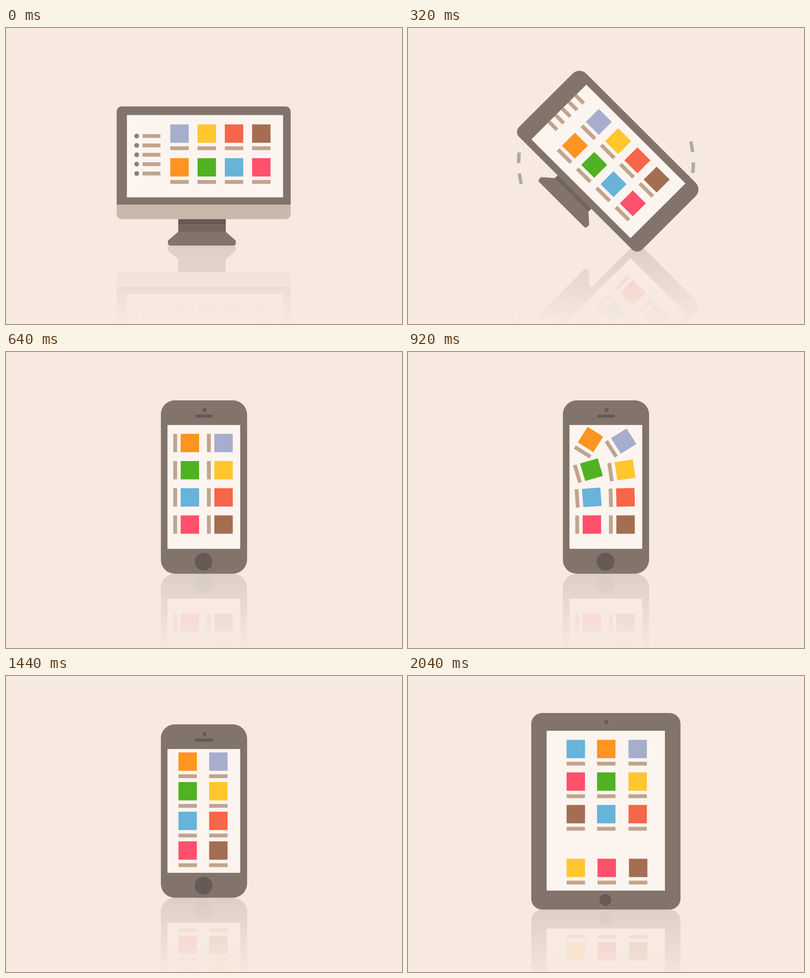
Write an HTML page that moves like this. It is 800 px wide and 600 px high and loops after 3.36 s.

```html
<!DOCTYPE html>
<html lang="en">
<head>
<meta charset="utf-8">
<title>Responsive devices</title>
<style>
  html, body { margin: 0; width: 100%; height: 100%; overflow: hidden; background: #f7e9e0; }
  svg { display: block; width: 100%; height: 100%; }
</style>
</head>
<body>
<svg id="stage" viewBox="0 0 800 600"></svg>
<script>
const LOOP = 3360, STEP = 40;
const BODY = '#82746b', DARK = '#655a55', BAR = '#c0a48e', SCREEN = '#fcf4ef';
const PURPLE = '#a7aecd', YELLOW = '#ffc62e', RED = '#f66648', BROWN = '#a36e52';
const ORANGE = '#ff9421', GREEN = '#50b222', BLUE = '#67b3d9', PINK = '#ff506c';
const GRID = [[PURPLE, YELLOW, RED, BROWN], [ORANGE, GREEN, BLUE, PINK]];
const EXTRA = [BLUE, PINK, BROWN, YELLOW];
const TABLET_ROWS = [148, 214, 280, 389];
const stage = document.getElementById('stage');

const lerp = (a, b, k) => a + (b - a) * k;
const rad = deg => deg * Math.PI / 180;

// cubic-bezier(.75, 0, .25, 1) over a time window
function ease(t, from, to) {
  const x = (t - from) / (to - from);
  if (x <= 0) return 0;
  if (x >= 1) return 1;
  let lo = 0, hi = 1, s = 0.5;
  for (let i = 0; i < 24; i++) {
    s = (lo + hi) / 2;
    const bx = 2.25 * s * (1 - s) ** 2 + 0.75 * s * s * (1 - s) + s ** 3;
    if (bx < x) lo = s; else hi = s;
  }
  return s * s * (3 - 2 * s);
}

const rect = (x, y, w, h, fill, r = 0) =>
  `<rect x="${x}" y="${y}" width="${w}" height="${h}" rx="${r}" fill="${fill}"/>`;
const disc = (x, y, r, fill) => `<circle cx="${x}" cy="${y}" r="${r}" fill="${fill}"/>`;

// Box centred on the origin with separate top and bottom radii
function box(w, h, top, bottom, fill) {
  const x = w / 2, y = h / 2;
  return `<path fill="${fill}" d="M${-x} ${top - y}a${top} ${top} 0 0 1 ${top} ${-top}H${x - top}` +
    `a${top} ${top} 0 0 1 ${top} ${top}V${y - bottom}a${bottom} ${bottom} 0 0 1 ${-bottom} ${bottom}` +
    `H${bottom - x}a${bottom} ${bottom} 0 0 1 ${-bottom} ${-bottom}Z"/>`;
}

function icon(x, y, angle, fill) {
  return `<g transform="translate(${x} ${y}) rotate(${angle})">` +
    rect(-18.6, -18.6, 37.2, 37.2, fill) + rect(-18.6, 25.8, 37.2, 7.7, BAR) + '</g>';
}

function stand(lift) {
  return `<g transform="translate(0 ${-lift})">` +
    rect(-51.3, 120, 96, 20, DARK) + rect(-51.3, 139.8, 96, 15.5, '#72655d') +
    `<path fill="${BODY}" d="M-51.3 154.5H44.7L65 172.5V177.5Q65 182.5 60 182.5H-67.3Q-72.3 182.5 -72.3 177.5V172.5Z"/>` +
    '<path fill="#c8b9ad" d="M-175.75 99.5H175.75V119a10 10 0 0 1 -10 10H-165.75a10 10 0 0 1 -10 -10Z"/></g>';
}

function trails(t, turn) {
  const r = 176.5;
  const tail = Math.max(-38, -14.1 + 0.2625 * (t - 320));
  const head = lerp(-40, 65, turn);
  if (head <= tail) return '';
  const at = a => `${400 - r * Math.cos(rad(a))} ${273 - r * Math.sin(rad(a))}`;
  const arc = spin => `<path d="M${at(tail)}A${r} ${r} 0 0 1 ${at(head)}" fill="none" stroke="#ababab"` +
    ` stroke-width="7" stroke-dasharray="21.5 21.2" transform="rotate(${spin} 400 273)"/>`;
  return arc(0) + arc(180);
}

function icons(t, turn, grow, cx, cy) {
  const cos = Math.cos(rad(90 * turn)), sin = Math.sin(rad(90 * turn));
  let out = '';
  GRID.forEach((row, i) => row.forEach((fill, j) => {
    const start = 640 + 40 * (2 * j + 1 - i);
    const flip = ease(t, start, start + 520);
    const lx = lerp(-48.8, -89.25, turn) + 55.1 * j;
    const ly = lerp(-44.5, -39.5, turn) + lerp(68.4, 68, turn) * i;
    let x = lerp(cx + lx * cos - ly * sin, i ? 367 : 429, flip);
    let y = lerp(cy + lx * sin + ly * cos, 173.5 + 60.1 * j, flip);
    x = lerp(x, (i ? 400.5 : 464) + (j === 3 ? 1 : 0), grow);
    y = lerp(y, TABLET_ROWS[j], grow);
    out += icon(x, y, 90 * (turn - flip), fill);
  }));
  if (grow > 0) EXTRA.forEach((fill, j) => {
    out += icon(lerp(302, 339, grow), lerp(173.5 + 60.1 * j, TABLET_ROWS[j], grow), 0, fill);
  });
  return out;
}

function sidebar(turn) {
  let out = '';
  for (let j = 0; j < 5; j++) {
    const y = -39.5 + 19 * j;
    out += disc(-135.3, y, 4.8, '#8d7f79') + rect(-123.5, y - 3.8, 36.2, 7.6, BAR);
  }
  return `<g transform="translate(${-60 * turn} ${-15 * turn})">${out}</g>`;
}

function draw(t) {
  const turn = ease(t, 0, 640), grow = ease(t, 1560, 2040), pop = ease(t, 240, 560);
  // monitor, phone, tablet
  const mix = (a, b, c) => a + (b - a) * turn + (c - b) * grow;
  const bulge = 4 * turn * (1 - turn);
  const cx = mix(399.3, 400, 399.75) + 4.95 * bulge;
  const cy = mix(258.5, 273.75, 274.25) + 2.75 * bulge;
  const floor = mix(441, 449.5, 473.5) + bulge;
  const pose = `transform="translate(${cx} ${cy}) rotate(${90 * turn})"`;

  const sw = mix(315.5, 251, 324), sh = mix(166.8, 147, 239);
  const sx = mix(2.7, -0.3, -1.25) - sw / 2, sy = mix(1.4, 0.3, 0.25) - sh / 2;

  const hardware =
    disc(mix(151.25, 151.25, 179.75), 1, mix(18, 18, 12) * pop, DARK) +
    disc(mix(-156.25, -156.25, -180.75), -1, 4.2 * pop, DARK) +
    rect(-143.75 - 3.3 * pop, -18 * pop, 6.6 * pop, 36 * pop, DARK, 3.3 * pop);

  stage.innerHTML =
    `<defs>
      <clipPath id="glass"><rect x="${sx}" y="${sy}" width="${sw}" height="${sh}" ${pose}/></clipPath>
      <linearGradient id="fade" gradientUnits="userSpaceOnUse" x1="0" x2="0" y1="${floor}" y2="${floor + 155}">
        <stop offset="0" stop-color="#fff" stop-opacity=".22"/><stop offset="1" stop-color="#fff" stop-opacity="0"/>
      </linearGradient>
      <mask id="shine" maskUnits="userSpaceOnUse" x="0" y="0" width="800" height="600">
        <rect y="${floor}" width="800" height="200" fill="url(#fade)"/>
      </mask>
    </defs>
    <rect width="800" height="600" fill="#f7e9e0"/>
    <g mask="url(#shine)"><use href="#device" transform="matrix(1 0 0 -1 0 ${2 * floor})"/></g>
    <g id="device">
      ${trails(t, turn)}
      <g ${pose}>
        ${stand(106 * turn)}
        ${box(mix(351.5, 351.5, 398.5), mix(199, 174.2, 301.5), mix(10, 29, 22), mix(0, 28, 22), BODY)}
        ${hardware}
        ${rect(sx, sy, sw, sh, SCREEN)}
      </g>
      <g clip-path="url(#glass)">
        ${turn < 1 ? `<g ${pose}>${sidebar(turn)}</g>` : ''}
        ${icons(t, turn, grow, cx, cy)}
      </g>
    </g>`;
}

const begin = performance.now();
let shown = -1;
function tick() {
  const t = Math.floor((performance.now() - begin) % LOOP / STEP) * STEP;
  if (t !== shown) draw(shown = t);
  requestAnimationFrame(tick);
}
tick();
</script>
</body>
</html>
```
